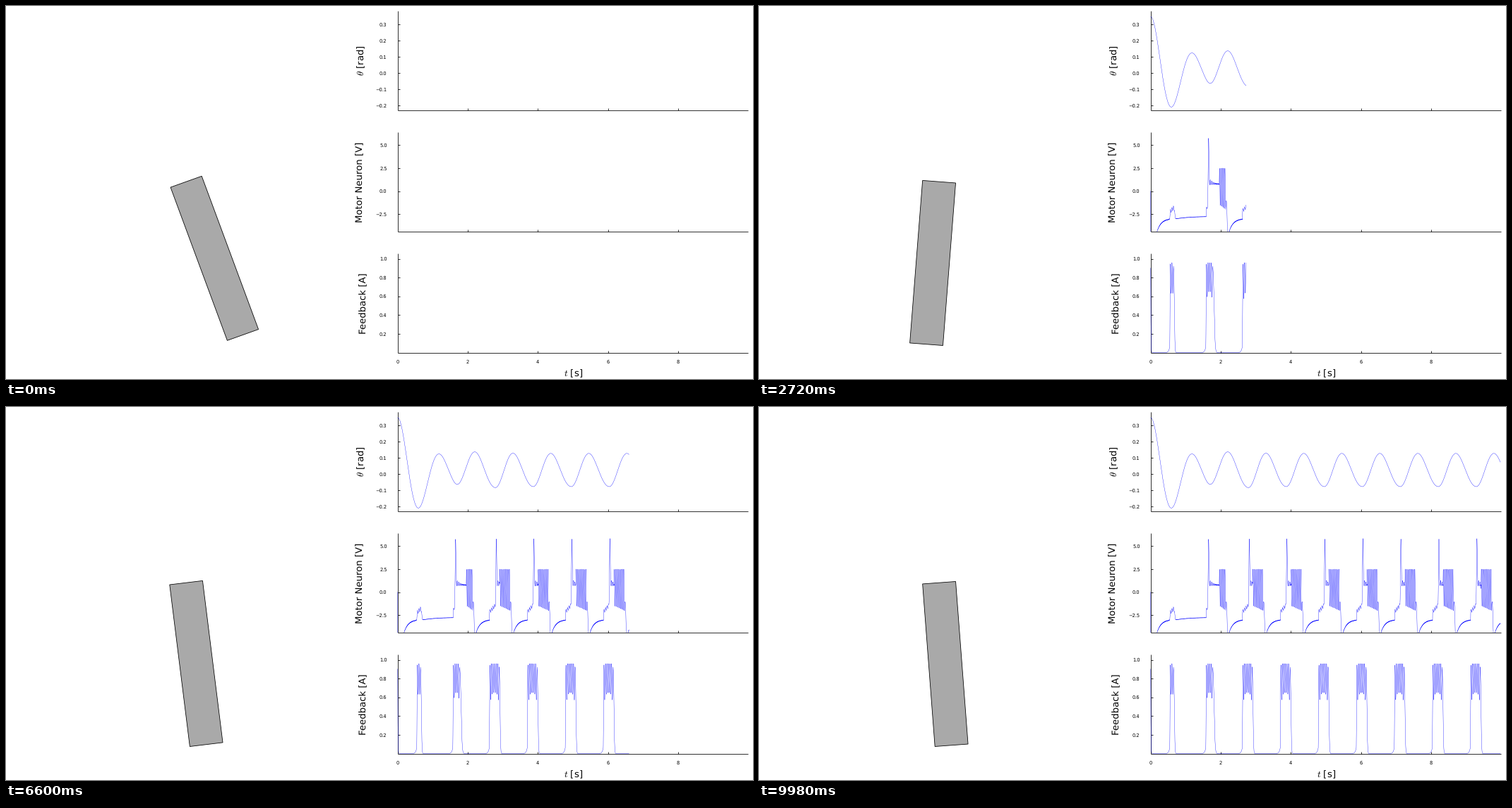
Recreate the animation shown at these times as a matplotlib script. Size 1058 by 529 pixels, loop 10 s.

```python
import numpy as np
import matplotlib.pyplot as plt
from matplotlib.animation import FuncAnimation
from matplotlib.collections import LineCollection
from matplotlib.patches import Polygon, Rectangle

plt.rcParams["font.family"] = "DejaVu Sans"
plt.rcParams["mathtext.fontset"] = "cm"
plt.rcParams["text.hinting"] = "none"

W, H, DPI = 1058, 529, 64
PX = 72 / DPI                      # points per pixel
STEPS, INTERVAL, SUB = 500, 20, 10
PERIOD = 1.085                     # steady swing period, s
BEAT = 0.0435                      # spacing of feedback pulses, s
X0, X1, PER_S = 554.8, 1051, 49.62

t = np.arange(STEPS * SUB) * INTERVAL / 1000 / SUB
cycles = PERIOD * np.arange(7)


def step(at, width):
    """Smooth switch from 0 to 1 (negative width: from 1 to 0)."""
    return 1 / (1 + np.exp(np.clip((at - t) / width, -60, 60)))


# ---- pendulum angle -------------------------------------------------
def half_swing(f, a, b, ratio):
    """Damped half oscillation from a to b, f in 0..1."""
    g = -np.log(ratio)
    d = np.exp(-g * f) * (np.cos(np.pi * f) + g / np.pi * np.sin(np.pi * f))
    return b + (a - b) * (d + ratio) / (1 + ratio)


def swing_angle():
    gam, om = 0.869, 5.34
    th = 0.349 * np.exp(-gam * t) * (np.cos(om * t) + gam / om * np.sin(om * t))
    m = t > 1.62                   # the first push cuts the swing short
    th[m] = -0.063 + 1.95 * (1.70 - t[m]) ** 2
    turns = [(1.70, -0.063), (2.20, 0.138), (2.79, -0.083), (3.29, 0.130)]
    for c in cycles:
        turns += [(3.87 + c, -0.077), (4.37 + c, 0.1285)]
    for (ta, a), (tb, b) in zip(turns, turns[1:]):
        m = (t >= ta) & (t < tb)
        th[m] = half_swing((t[m] - ta) / (tb - ta), a, b, 0.6 if a > b else 0.8)
    return th


# ---- motor neuron voltage -------------------------------------------
def motor_voltage():
    ripple = 0.035 * np.sin(2 * np.pi * 110 * t)

    def recover(start):
        lag = np.maximum(t - start, -0.2)
        return -3 - 1.41 * np.exp(-lag / 0.12) + ripple

    def climb(onset, length):
        f = np.clip((t - onset) / length, 0, 1)
        return (-2.2 + 0.9 * f
                + 0.2 * np.cos(2 * np.pi * (t - onset - 0.022) / BEAT))

    rest = -2.75 - 0.25 * np.exp(-(t - 0.75) / 0.4) + 0.6 * ripple
    v = np.where(t < 0.7, recover(0.18), rest)
    v[0] = 0
    v += (climb(0.54, 0.25) + 3) * step(0.55, 0.004) * step(0.685, -0.008)

    def cycle(onset, spike, train, n):
        """Climb, one tall spike, ringing, a fast train, then silence."""
        s = t - spike
        ring = (0.75 + 0.35 * np.exp(-np.maximum(s, 0) / 0.1)
                + 0.45 * np.cos(2 * np.pi * (s - 0.05) / 0.038)
                * np.exp(-np.maximum(s, 0) / 0.1) + ripple)
        up = step(spike - 0.014, 0.003)
        wave = climb(onset, spike - onset) * (1 - up) + ring * up
        wave += 4.85 * np.exp(-(s / 0.013) ** 2)

        p = (t - train) / 0.0385
        low = -1.5 - 0.55 * p / n
        fast = low + (2.5 - low) * (1 + np.cos(2 * np.pi * p)) / 2
        last = train + 0.0385 * (n - 0.5)
        bump = -1.05 - ((t - last - 0.018) / 0.018) ** 2

        parts = [(onset + 0.01, wave), (train - 0.01, fast), (last, bump),
                 (last + 0.055, recover(last + 0.1))]
        for start, values in parts:
            v[t > start] = values[t > start]

    cycle(1.57, 1.65, 1.965, 5)
    cycle(2.61, 2.813, 2.918, 8)
    for c in cycles[:6]:
        cycle(3.695 + c, 3.885 + c, 4.013 + c, 8)
    return v


# ---- feedback current -----------------------------------------------
def feedback():
    a = 0.002 + 0.9 * np.exp(-t / 0.006)

    def burst(onset, n, fall=0.008):
        """n pulses on a plateau, deepest dips at both ends."""
        p = np.clip((t - onset - 0.022) / BEAT, 0, n - 1)
        depth = 0.31 + 0.13 * np.abs(2 * p / (n - 1) - 1) ** 3
        level = 0.96 - depth * (1 - np.cos(2 * np.pi * p)) / 2
        end = onset + 0.022 + BEAT * (n - 1)
        gate = step(onset + 0.01, 0.003) * step(end + 3.2 * fall, -fall)
        lead = 0.06 * np.exp(np.minimum(t - onset, 0) / 0.03) * (t < onset + 0.01)
        np.maximum(a, np.maximum(level * gate, lead), out=a)

    burst(0.541, 3)
    burst(1.570, 5, 0.014)
    burst(2.612, 7)
    for c in cycles[:6]:
        burst(3.695 + c, 7)
    return a


# ---- drawing ---------------------------------------------------------
fig = plt.figure(figsize=(W / DPI, H / DPI), dpi=DPI, facecolor="white")
ax = fig.add_axes([0, 0, 1, 1])
ax.set_xlim(0, W)
ax.set_ylim(H, 0)
ax.axis("off")

TICK, LABEL = 6.65 * PX, 13.2 * PX
segments = []


def panel(top, bottom, zero, scale, ticks, label, lx, ly, data):
    segments.append([(X0, top), (X0, bottom)])
    segments.append([(X0, bottom), (X1, bottom)])
    for s in (2, 4, 6, 8):
        x = X0 + s * PER_S
        segments.append([(x, bottom), (x, bottom - 3)])
    for v in ticks:
        y = zero - v * scale
        segments.append([(X0, y), (X0 + 3, y)])
        ax.text(539.6, y + 2.5, f"{v:.1f}".replace("-", "\u2212"), size=TICK,
                ha="right", va="baseline")
    ax.text(lx, ly, label, size=LABEL, rotation=90, ha="center",
            va="baseline", rotation_mode="anchor")
    line, = ax.plot([], [], color="blue", lw=0.36 * PX, zorder=3)
    line.set_clip_path(Rectangle((X0 - 0.5, top), X1 - X0 + 0.5,
                                 bottom - top + 0.5, transform=ax.transData))
    return line, zero - scale * data


theta = swing_angle()
xs = X0 + PER_S * t
curves = [
    panel(7, 147.9, 95.3, 229.6, np.arange(3, -3, -1) / 10,
          r"$\theta$ [rad]", 507, 77, theta),
    panel(179, 319.9, 262.5, 13.03, np.arange(5, -5, -2.5),
          "Motor Neuron [V]", 505, 249.5, motor_voltage()),
    panel(350.5, 491.6, 491.7, 133.1, np.arange(5, 0, -1) / 5,
          "Feedback [A]", 510, 421.3, feedback()),
]
ax.add_collection(LineCollection(segments, colors="black",
                                 linewidths=0.8 * PX, zorder=2))
for s in range(0, 10, 2):
    ax.text(X0 + s * PER_S, 506.6, str(s), size=TICK, ha="center", va="baseline")
ax.text(803.4, 525, "$t$ [s]", size=LABEL, ha="center", va="baseline")

PIVOT = np.array([255.1, 249.2])
SCALE = np.array([235.0, 231.2])
BODY = np.array([(-0.1, 0), (0.1, 0), (0.1, 1), (-0.1, 1)])
rod = Polygon(BODY, closed=True, fc="#a9a9a9", ec="black", lw=0.8 * PX,
              joinstyle="miter")
ax.add_patch(rod)


def draw(n):
    c, s = np.cos(theta[n * SUB]), np.sin(theta[n * SUB])
    rod.set_xy(PIVOT + SCALE * (BODY @ np.array([(c, -s), (s, c)])))
    k = n * SUB + 1
    for line, ys in curves:
        line.set_data(xs[:k], ys[:k])
    return [rod] + [line for line, _ in curves]


anim = FuncAnimation(fig, draw, frames=STEPS, interval=INTERVAL,
                     init_func=lambda: draw(0), repeat=True, repeat_delay=0,
                     blit=False)
plt.show()
```
